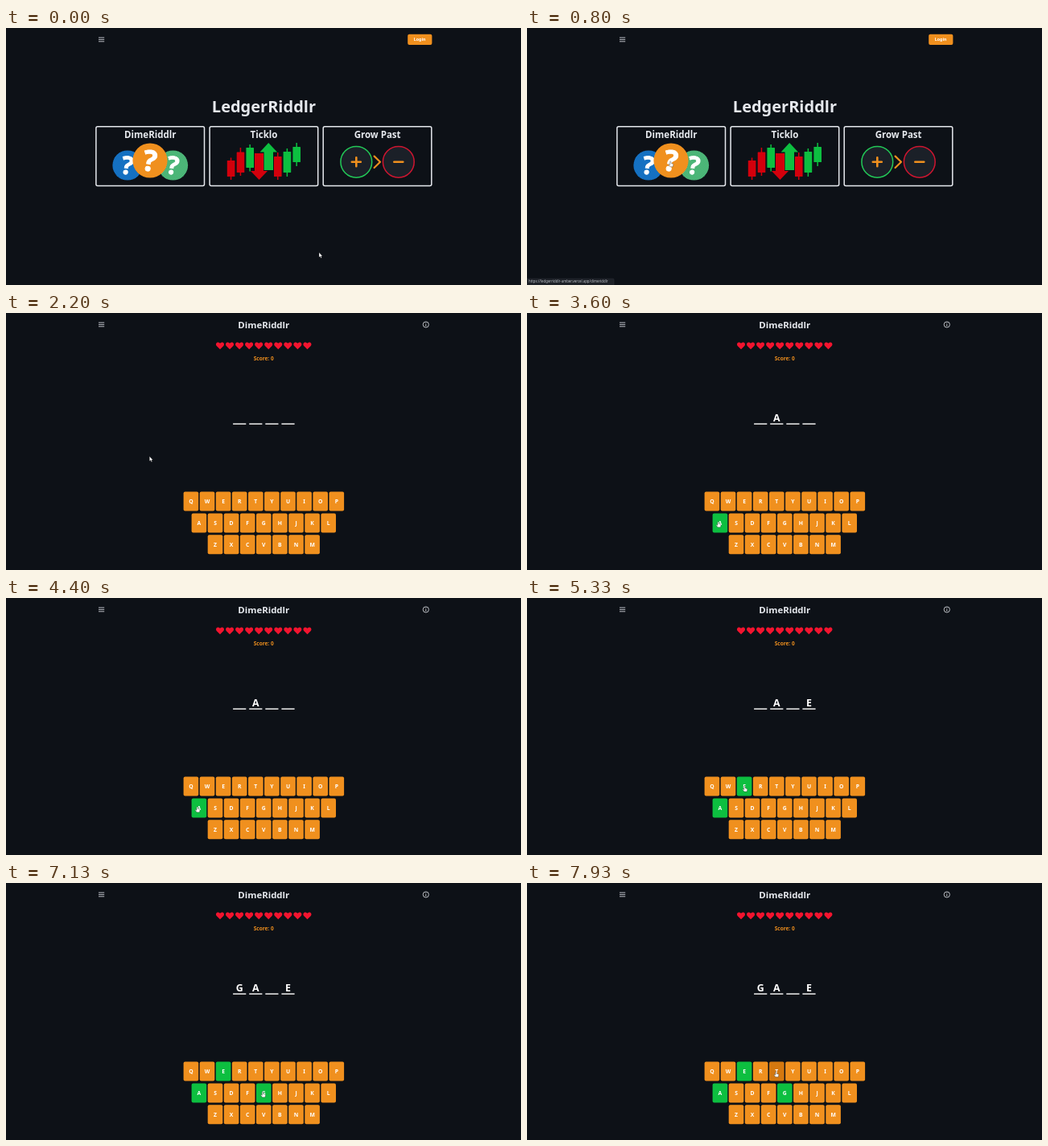
An HTML page that plays this animation: 640 by 320 pixels, repeating every 8 s.

```html
<!DOCTYPE html>
<html lang="en">
<head>
<meta charset="utf-8">
<title>LedgerRiddlr</title>
<style>
  html, body { margin: 0; width: 100%; height: 100%; overflow: hidden; background: #0d1117; }
  svg { display: block; width: 100%; height: 100%; }
  text { font-family: "Noto Sans", "Open Sans", sans-serif; font-weight: 700; text-anchor: middle; }
</style>
</head>
<body>
<svg id="stage" viewBox="0 0 640 320"></svg>
<script>
const LOOP = 8000;
const INK = '#e6e9ee', ORANGE = '#f0901e', HOVER = '#d4780f';
const GREEN = '#0dbf40', RED = '#d3000c', HEART = '#f3142f';

// Times of the hard changes, in ms
const AT = { link: 700, page: 960, linkEnd: 1560, game: 1800 };
const PICKS = { A: 3150, E: 5100, G: 7100 };
const WORD = 'GA_E';
const ROWS = [['QWERTYUIOP', 220.6, 222.5], ['ASDFGHJKL', 230.6, 249.4], ['ZXCVBNM', 250.7, 276.2]];
const KEY = { w: 18.6, h: 24, step: 20.1 };

// Pointer stops: time, x, y
const PATH = [
  [0, 389, 279.5], [80, 389, 279.5], [800, 178.3, 166], [1400, 178.3, 166], [1700, 178.3, 178.5],
  [2350, 178.3, 178.5], [2850, 237.5, 260], [4430, 237.5, 260], [4950, 270.3, 234.3],
  [6120, 270.3, 234.3], [6300, 273.7, 246.8], [6400, 273.7, 246.8], [6850, 319, 260],
  [7350, 319, 260], [7830, 309.3, 234.8], [LOOP, 309.3, 234.8]
];

const label = (s, x, y, size, fill = INK, extra = '') =>
  `<text x="${x}" y="${y}" font-size="${size}" fill="${fill}" ${extra}>${s}</text>`;
const rect = (x, y, w, h, fill, extra = '') =>
  `<rect x="${x}" y="${y}" width="${w}" height="${h}" fill="${fill}" ${extra}/>`;
const circle = (x, y, r, fill, extra = '') =>
  `<circle cx="${x}" cy="${y}" r="${r}" fill="${fill}" ${extra}/>`;
const line = (d, color, width, extra = '') =>
  `<path d="${d}" fill="none" stroke="${color}" stroke-width="${width}" ${extra}/>`;
const shape = (d, fill, extra = '') => `<path d="${d}" fill="${fill}" ${extra}/>`;

const card = (x, title) =>
  rect(x, 122.7, 134.6, 73.8, 'none', `rx="2" stroke="${INK}" stroke-width="1.5"`) +
  label(title, x + 67.4, 137, 11.5);

const coin = (x, y, r, fill, size) =>
  circle(x, y, r, fill) +
  label('?', x, y + size * .36, size, '#fff', `transform="rotate(9 ${x} ${y})" stroke="#fff" stroke-width="1"`);

const candle = (x, top, bottom, high, low, fill) =>
  rect(x + 4, high, 1.5, low - high, fill) + rect(x, top, 9.6, bottom - top, fill, 'rx=".6"');

function home() {
  const coins = coin(151, 171, 18.6, 'url(#blue)', 31) + coin(207.5, 171, 18.6, 'url(#mint)', 31) +
    coin(179, 165, 21.6, ORANGE, 36);
  const chart = candle(274.8, 165, 185, 161.5, 189, RED) + candle(286.7, 154.5, 180, 149, 184, RED) +
    candle(298.4, 149, 174, 145, 178.5, GREEN) +
    shape('M309 156H320V178H325L314.5 189 304 178H309Z', RED) +
    shape('M326.2 143L337 154.5H332V177H320.6V154.5H315.6Z', GREEN) +
    candle(333, 160, 185, 155, 189, RED) + candle(344.6, 154, 180, 150, 185, GREEN) +
    candle(356.4, 148, 167, 143, 172, GREEN);
  const round = 'stroke-linecap="round" stroke-linejoin="round"';
  const signs = circle(435.3, 166.8, 19.4, '#1b2028', `stroke="#22c957" stroke-width="1.5"`) +
    circle(487.8, 166.8, 19.4, '#1b2028', `stroke="#cf1530" stroke-width="1.5"`) +
    line('M429.8 166.8H440.8M435.3 161.3V172.3', ORANGE, 2.6, round) +
    line('M482.3 166.8H493.3', ORANGE, 2.6, round) +
    line('M457.6 159.6L465 166.8 457.6 174', ORANGE, 2.2, round);
  return rect(499.2, 7.8, 30.2, 13.2, ORANGE, 'rx="2"') + label('Login', 514.2, 16.4, 5.3, '#fff') +
    label('LedgerRiddlr', 320.4, 104.5, 20) +
    card(111.9, 'DimeRiddlr') + card(253.1, 'Ticklo') + card(394.2, 'Grow Past') + coins + chart + signs;
}

const header = label('DimeRiddlr', 320.3, 19, 11.4) +
  circle(521.8, 14.4, 3.6, 'none', `stroke="${INK}" stroke-width=".8"`) +
  line('M521.8 14V16.4M521.8 12.2V13', INK, .9);

const keys = ROWS.flatMap(([letters, x, y]) =>
  [...letters].map((ch, i) => ({ ch, x: x + i * KEY.step, y })));

function game() {
  let s = '';
  for (let i = 0; i < 10; i++)
    s += shape('M0 4.7L-4.3 .4C-6.4 -2 -3.6 -6.2 0 -2.9C3.6 -6.2 6.4 -2 4.3 .4Z', HEART,
      `transform="translate(${266 + i * 12.05} 40.6)"`);
  s += label('Score: <tspan font-weight="700">0</tspan>', 320.2, 58.6, 6.5, ORANGE, 'style="font-weight:600"');
  [...WORD].forEach((ch, i) => {
    const x = 290.2 + i * 20.1;
    s += rect(x - 8.1, 137.4, 16.2, 1.4, '#fff');
    if (ch !== '_') s += label(ch, x, 135, 12.4, '#fff', `data-slot="${ch}"`);
  });
  for (const { ch, x, y } of keys)
    s += rect(x, y, KEY.w, KEY.h, ORANGE, `rx="2" data-key="${ch}"`) +
      label(ch, x + KEY.w / 2, y + 14.6, 6.8, '#fff');
  return s;
}

const dots = (id, base, dot) =>
  `<pattern id="${id}" width="2" height="2" patternUnits="userSpaceOnUse">${rect(0, 0, 2, 2, base)}` +
  rect(0, 0, 1, 1, dot) + rect(1, 1, 1, 1, dot) + '</pattern>';

const stage = document.getElementById('stage');
stage.innerHTML = `<defs>${dots('blue', '#0c62b4', '#1d7fcf')}${dots('mint', '#35a866', '#62c389')}</defs>` +
  rect(0, 0, 640, 320, '#0d1117') +
  line('M115 12H122.2M115 14.4H122.2M115 16.8H122.2', '#cfd3d8', .9) +
  `<g id="home">${home()}</g><g id="header">${header}</g>` +
  `<g id="spinner">${line('M3 -5.2A6 6 0 1 1 -3 -5.2', '#f1f3f5', 1.4)}</g>` +
  `<g id="game">${game()}</g>` +
  `<g id="link">${rect(-1, 312.2, 109, 9, '#1d2127', 'rx="1" stroke="#30353c" stroke-width=".5"')}` +
  label('https://ledgerriddlr-amber.vercel.app/dimeriddlr', 2, 317.4, 4.35, '#b9bec5',
    'style="text-anchor:start;font-weight:400"') + '</g>' +
  `<g id="pointer">${shape('M0 0V6L1.4 4.8 2.4 7 3.4 6.5 2.5 4.4H4.2Z', '#fff', 'id="arrow" stroke="#111" stroke-width=".3"')}` +
  shape('M-.6 .3Q0 -.5 .6 .3V2.5L3 3.1Q3.7 3.3 3.5 4.2L3 6.8H-.4L-2.4 4.2Q-2.3 3.3 -1.4 3.8L-.6 4.4Z',
    '#fff', 'id="hand" stroke="#222" stroke-width=".35"') + '</g>';

const el = id => document.getElementById(id);
const show = (node, on) => { node.style.display = on ? '' : 'none'; };
const slots = [...stage.querySelectorAll('[data-slot]')];
keys.forEach(k => { k.node = stage.querySelector(`[data-key="${k.ch}"]`); });

function pointerAt(t) {
  const i = PATH.findIndex(p => p[0] > t);
  const [t0, x0, y0] = PATH[i - 1], [t1, x1, y1] = PATH[i];
  const u = (t - t0) / (t1 - t0), e = u * u * (3 - 2 * u);
  return [x0 + (x1 - x0) * e, y0 + (y1 - y0) * e];
}

function draw(t) {
  const [x, y] = pointerAt(t);
  const playing = t >= AT.game, loading = t >= AT.page && !playing;
  show(el('home'), t < AT.page);
  show(el('header'), t >= AT.page);
  show(el('spinner'), loading);
  show(el('game'), playing);
  show(el('link'), t >= AT.link && t < AT.linkEnd);
  el('spinner').setAttribute('transform', `translate(320.3 159.6) rotate(${(t - 1330) * .36 - 5})`);

  let over = t < AT.page && x > 112 && x < 246 && y > 123 && y < 197;
  for (const k of keys) {
    const hit = playing && x >= k.x && x <= k.x + KEY.w && y >= k.y && y <= k.y + KEY.h;
    over = over || hit;
    k.node.setAttribute('fill', t >= PICKS[k.ch] ? GREEN : hit ? HOVER : ORANGE);
  }
  slots.forEach(s => show(s, t >= PICKS[s.dataset.slot]));

  el('pointer').setAttribute('transform', `translate(${x} ${y})`);
  show(el('hand'), over);
  show(el('arrow'), !over);
}

const start = performance.now();
function tick() {
  draw((performance.now() - start) % LOOP);
  requestAnimationFrame(tick);
}
tick();
</script>
</body>
</html>
```
